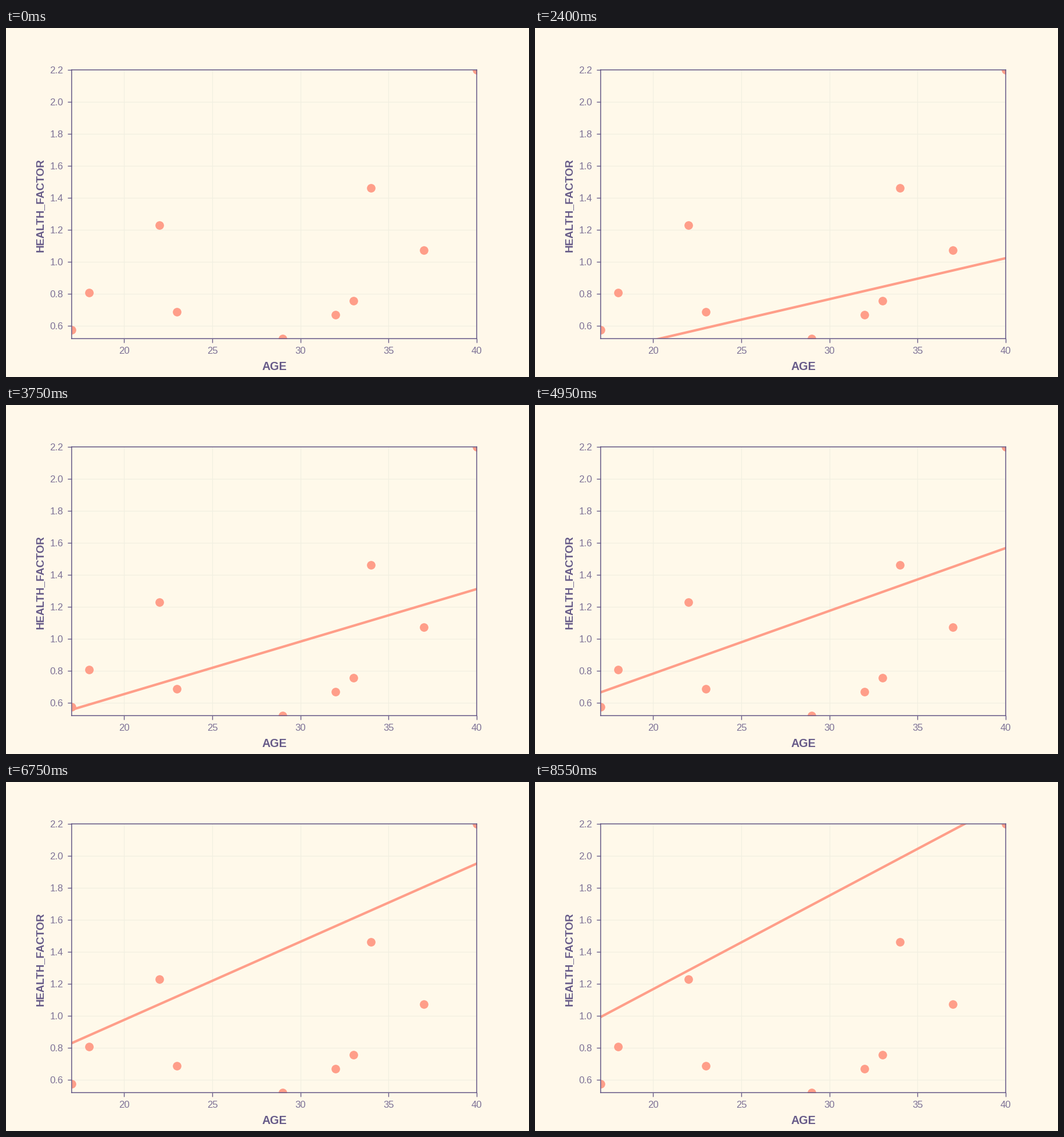
A matplotlib script that plays this animation: 900 px wide and 600 px high, repeating every 9.15 s.

```python
import numpy as np
import matplotlib.pyplot as plt
from matplotlib.animation import FuncAnimation

W, H, DPI = 900, 600, 100
STEP_MS = 150
LAST_STEP = 57      # the line stops here
FRAMES = 61         # includes the hold at the end

PAPER = "#fff8ea"
PANEL = "#fff9ea"
INK = "#665a88"
GRID = "#f0efe1"
CORAL = "#ff9e89"

AGES = [17, 18, 22, 23, 29, 32, 33, 34, 37, 40]
FACTORS = [0.577, 0.81, 1.231, 0.69, 0.5215, 0.672, 0.759, 1.462, 1.073, 2.2]

plt.rcParams["font.family"] = "Liberation Sans"

fig = plt.figure(figsize=(W / DPI, H / DPI), dpi=DPI, facecolor=PAPER)
ax = fig.add_axes([0.125, 0.11, 0.775, 0.77], facecolor=PANEL)
ax.set_xlim(min(AGES), max(AGES))
ax.set_ylim(min(FACTORS), max(FACTORS))
ax.set_xticks(np.arange(20, 41, 5))
ax.set_yticks(np.arange(6, 23, 2) / 10)
ax.yaxis.set_major_formatter("{x:.1f}")
ax.set_axisbelow(True)
ax.grid(color=GRID, lw=0.8)
ax.tick_params(length=5, width=1, pad=5, color=INK, labelcolor=INK, labelsize=12)
for label in ax.get_xticklabels() + ax.get_yticklabels():
    label.set_alpha(0.85)
for spine in ax.spines.values():
    spine.set(color=INK, linewidth=1.1)


def axis_title(x, y, text, size, rotation=0):
    fig.text(x / W, 1 - y / H, text, size=size, weight="bold", color=INK,
             ha="center", va="baseline", rotation=rotation,
             rotation_mode="anchor")


axis_title(461.5, 588, "AGE", 14.2)
axis_title(64, 304.5, "HEALTH_FACTOR", 13.4, 90)

ax.plot(AGES, FACTORS, "o", ms=10.6, mew=0, color=CORAL, zorder=2)
line, = ax.plot([], [], color=CORAL, lw=3, zorder=2.1)
span = np.array([0, 45])


def update(i):
    slope = 0.0008 * (16 + min(i, LAST_STEP))
    line.set_data(span, slope * span)
    return line,


anim = FuncAnimation(fig, update, frames=FRAMES, interval=STEP_MS,
                     repeat=True, repeat_delay=0)
plt.show()
```
